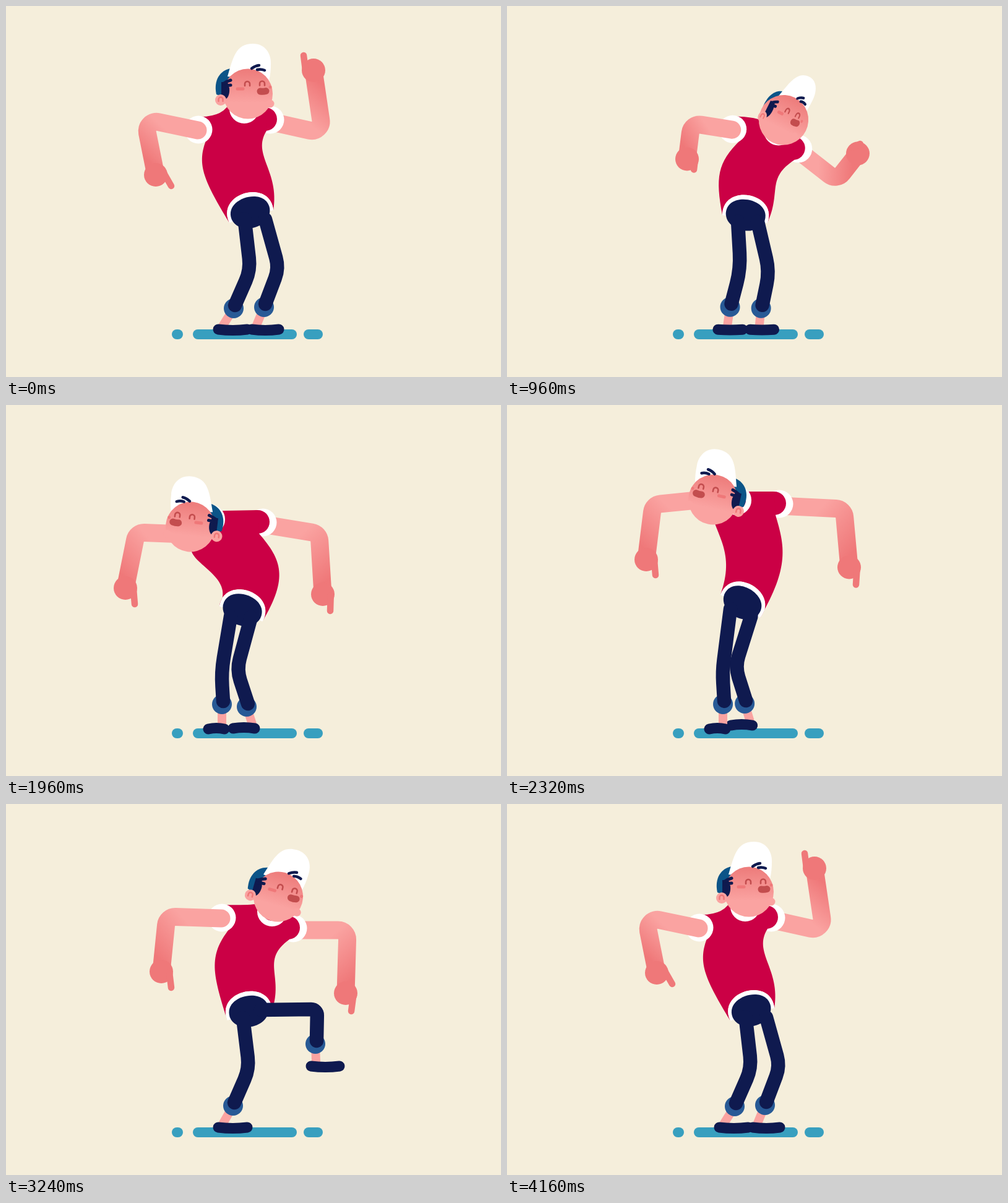
An HTML page with a canvas that plays this animation: 800 px wide and 600 px high, repeating every 4200 ms.

```html
<!DOCTYPE html>
<html lang="en">
<head>
<meta charset="utf-8">
<title>Dancer</title>
<style>
html, body { margin: 0; width: 100%; height: 100%; overflow: hidden; background: #f5eedb; }
canvas { display: block; }
</style>
</head>
<body>
<canvas id="stage" width="800" height="600"></canvas>
<script>
const ctx = document.getElementById('stage').getContext('2d');
const LOOP = 4200, STEP = 40;
const RED = '#cb0045', WHITE = '#fff', NAVY = '#0f1a4f', CUFF = '#285a96', CAP = '#0c5488',
  TEAL = '#389fbf', LIGHT = '#faa3a1', DARK = '#ef7879', LIP = '#c34d4e';

// head: x, y, tilt, facing     hip: x, y, tilt     sleeves: left x, y, right x, y
// bend: side curves of the shirt, left then right
// arms: elbow, hand, fingertip     legs: knee, cuff, shoe ends and height
const groove = {
  head: [391, 142, 0, 1], collar: [385, 166], hip: [395.5, 336.5, -.28],
  sleeves: [311, 200, 427, 184], bend: [-28, -27, -28, 14],
  armL: [224, 183, 242, 273, 267, 291], armR: [512, 206, 497, 104, 481, 80],
  legL: [395, 427, 368, 489, 343, 390, 523], legR: [441, 424, 417, 487, 397, 441, 523], hipR: [419, 345]
};
const lean = {
  head: [477, 178, .62, 1], collar: [460, 197], hip: [387, 337, .1],
  sleeves: [381, 181, 485, 234], bend: [-42, -31, -52, 0],
  armL: [303, 137, 261, 213, 267, 243], armR: [553, 290, 602, 202, 604, 171],
  legL: [389, 422, 365, 487, 343, 390, 523], legR: [442, 427, 418, 488, 397, 441, 523], hipR: [409, 345]
};
const crouch = {
  head: [363, 202, 0, -1], collar: [380, 214], hip: [380, 351, .4],
  sleeves: [319, 250, 431, 222], bend: [13, 8, 24, 33],
  armL: [285, 337, 375, 344, 400, 325], armR: [476, 261, 469, 341, 478, 369],
  legL: [345, 432, 348, 486, 335, 355, 524], legR: [373, 435, 390, 491, 381, 405, 524], hipR: [394, 360]
};
const bow = {
  head: [298, 197, .12, -1], collar: [330, 185], hip: [381, 334, .34],
  sleeves: [288, 208, 415, 190], bend: [-26, 43, 35, 44],
  armL: [211, 206, 193, 296, 208, 322], armR: [506, 208, 512, 306, 524, 333],
  legL: [348, 432, 349, 484, 327, 353, 524], legR: [373, 428, 389, 488, 367, 402, 523], hipR: [396, 343]
};
const kickLeft = {
  head: [333, 153, .21, -1], collar: [371, 154], hip: [379, 322, .53],
  sleeves: [318, 152, 440, 160], bend: [2, 30, 23, 40],
  armL: [236, 161, 225, 250, 240, 275], armR: [533, 174, 529, 272, 539, 301],
  legL: [350, 410, 350, 481, 327, 353, 524], legR: [268, 304, 267, 362, 231, 268, 399], hipR: [360, 304]
};
const kickRight = {
  head: [440, 150, .28, 1], collar: [430, 174], hip: [393, 338, -.21],
  sleeves: [349, 184, 464, 201], bend: [-34, -24, -38, 10],
  armL: [260, 182, 251, 271, 267, 297], armR: [552, 204, 549, 306, 558, 335],
  legL: [393, 428, 367, 488, 343, 390, 523], legR: [503, 332, 500, 388, 493, 539, 424], hipR: [412, 333]
};

const lerp = (a, b, t) => a + (b - a) * t;
function mix(p, q, t) {
  const out = {};
  for (const k in p) out[k] = p[k].map((v, i) => lerp(v, q[k][i], t));
  return out;
}
const legsOf = ({ legL, legR, hipR }) => ({ legL, legR, hipR });

const keys = [
  [0, groove], [590, lean], [650, lean],
  [1120, mix(lean, crouch, .36)], [1320, crouch],
  [1650, { ...bow, armL: [199, 203, 178, 293, 190, 320] }], [1960, bow],
  [2260, { ...kickLeft, ...legsOf(bow), armR: [545, 168, 554, 262, 565, 290] }],
  [2760, kickLeft],
  [2880, { ...kickLeft, ...legsOf(mix(kickLeft, bow, .4)), armL: [224, 157, 208, 245, 222, 271] }],
  [3030, { ...mix(kickLeft, kickRight, .5), ...legsOf(mix(bow, groove, .6)) }],
  [3240, kickRight],
  [3385, { ...kickRight, ...legsOf(mix(kickRight, groove, .6)), armR: [562, 215, 602, 285, 609, 312] }],
  [4140, groove], [LOOP, groove]
];

function poseAt(t) {
  const i = keys.findIndex(k => k[0] > t);
  const [t0, p] = keys[i - 1], [t1, q] = keys[i];
  const u = (t - t0) / (t1 - t0);
  return mix(p, q, u * u * (3 - 2 * u));
}

function dot(x, y, r, color) {
  ctx.fillStyle = color;
  ctx.beginPath();
  ctx.arc(x, y, r, 0, 7);
  ctx.fill();
}
function brush(color, width) {
  ctx.strokeStyle = color;
  ctx.lineWidth = width;
  ctx.lineCap = ctx.lineJoin = 'round';
}
function line(x1, y1, x2, y2, width, color, sag = 0) {
  brush(color, width);
  ctx.beginPath();
  ctx.moveTo(x1, y1);
  ctx.quadraticCurveTo((x1 + x2) / 2, (y1 + y2) / 2 + sag, x2, y2);
  ctx.stroke();
}
function limb(x, y, jx, jy, ex, ey, width, color, round) {
  brush(color, width);
  ctx.beginPath();
  ctx.moveTo(x, y);
  ctx.arcTo(jx, jy, ex, ey, round);
  ctx.lineTo(ex, ey);
  ctx.stroke();
}
function shape(path, color) {
  ctx.fillStyle = color;
  ctx.fill(new Path2D(path));
}

function arm(x, y, [ex, ey, hx, hy, fx, fy]) {
  const skin = ctx.createLinearGradient(x, y, hx, hy);
  skin.addColorStop(.35, LIGHT);
  skin.addColorStop(.92, DARK);
  limb(x, y, ex, ey, hx, hy, 29, skin, 15);
  dot(hx, hy, 19, DARK);
  const a = Math.atan2(fy - hy, fx - hx) - .95;
  line(hx + 13 * Math.cos(a), hy + 13 * Math.sin(a), fx, fy, 10.5, DARK);
}

// A nearly straight knee is a long soft curve, a raised one a tight corner.
function kneeRadius(x, y, kx, ky, ex, ey) {
  const turn = Math.atan2(ey - ky, ex - kx) - Math.atan2(ky - y, kx - x);
  return Math.min(200, 10 / Math.abs(Math.tan(turn / 2)) ** 1.5);
}

function leg(x, y, [kx, ky, cx, cy, s1, s2, sy], face) {
  line(cx, cy, lerp(s2 - 4, s1 + 8, (face + 1) / 2), sy - 7, 14, LIGHT);
  line(s1, sy, s2, sy, 17, NAVY, 3 * face);
  dot(cx, cy, 16, CUFF);
  const path = [x, y, kx, ky, cx + 2, cy - 5];
  limb(...path, 22.5, NAVY, kneeRadius(...path));
}

function torso({ collar: [cx, cy], hip: [hx, hy, tilt], sleeves: [lx, ly, wx, wy], bend }) {
  const sin = Math.sin(tilt), cos = Math.cos(tilt);
  const at = (x, y) => [hx + x * cos - y * sin, hy + x * sin + y * cos];
  const left = at(-37, 4), right = at(37, 4), hem = [...at(46, -48), ...at(-46, -48), ...left];
  const rx = wx - 8, ry = wy - 1;
  const side = (x1, y1, x2, y2, b1, b2, f1, f2) => ctx.bezierCurveTo(
    lerp(x1, x2, 1 / 3) + b1, lerp(y1, y2, f1),
    lerp(x1, x2, 2 / 3) + b2, lerp(y1, y2, f2), x2, y2);

  dot(wx, wy, 22.5, WHITE);
  dot(rx, ry, 19, RED);
  ctx.beginPath();
  ctx.moveTo(lx, ly - 21);
  ctx.quadraticCurveTo(cx - 32, ly - 20, cx - 22, cy - 13);
  ctx.lineTo(cx + 22, cy - 14);
  ctx.lineTo(rx, ry - 19);
  ctx.lineTo(rx + 2, ry + 19);
  side(rx + 2, ry + 19, ...right, bend[2], bend[3], .3, .5);
  ctx.bezierCurveTo(...hem);
  side(...left, lx + 12, ly + 18, bend[1], bend[0], .5, .7);
  ctx.fill();

  brush(WHITE, 9);
  ctx.beginPath();
  ctx.arc(cx, cy, 19.5, 0, 7);
  ctx.stroke();

  ctx.fillStyle = WHITE;
  ctx.beginPath();
  ctx.moveTo(...right);
  ctx.bezierCurveTo(...hem);
  ctx.fill();
  ctx.fillStyle = NAVY;
  ctx.beginPath();
  ctx.moveTo(...at(32, 0));
  ctx.bezierCurveTo(...at(36, -37), ...at(-36, -37), ...at(-32, 0));
  ctx.bezierCurveTo(...at(-27, 30), ...at(27, 30), ...at(32, 0));
  ctx.fill();
}

function smile(x, y, r, color, width) {
  brush(color, width);
  ctx.beginPath();
  ctx.moveTo(x - r, y + 3);
  ctx.arc(x, y, r, Math.PI, 0);
  ctx.lineTo(x + r, y + 3);
  ctx.stroke();
}

function head([x, y, tilt, face]) {
  const turn = Math.sign(face || 1) * Math.min(1, Math.max(.45, Math.abs(face) * 1.6));
  ctx.save();
  ctx.translate(x, y);
  ctx.rotate(tilt);
  ctx.scale(turn, 1);
  shape('M-51 1C-56-22-45-38-28-41L-15-20L-40 5Z', CAP);
  shape('M-33-28C-24-58-20-81 8-81C30-81 38-62 37-48C37-38 36-30 34-20Z', WHITE);

  const skin = ctx.createLinearGradient(0, -40, 0, 40);
  skin.addColorStop(.05, '#ee7e7d');
  skin.addColorStop(.68, LIGHT);
  ctx.fillStyle = skin;
  ctx.beginPath();
  ctx.ellipse(0, 0, 40 / Math.abs(turn), 40.5, 0, 0, 7);
  ctx.fill();
  dot(36, 16, 6.5, LIGHT);
  dot(36, -11, 2.5, DARK);

  shape('M-43-19L-33-19L-30-9C-29 1-33 9-38 9L-43 2Z', NAVY);
  line(-39, -17, -28, -22, 5, NAVY, -1);
  line(-39, -12, -28, -14, 5, NAVY, -1);
  line(6, -41, 18, -46, 4.5, NAVY, -2);
  line(15, -39, 27, -38, 4.5, NAVY, -2);
  dot(-44, 10, 9, LIGHT);
  smile(-44, 9, 3.5, DARK, 2.5);

  smile(-1, -16, 4, LIP, 2.6);
  smile(23, -16.5, 4, LIP, 2.6);
  line(-17, -8, -8, -8, 5, DARK);
  line(20, -4, 29, -4.5, 11, LIP, 1);
  ctx.restore();
}

function draw(now) {
  const t = now % LOOP;
  const p = poseAt(t - t % STEP);
  const face = p.head[3], [lx, ly, rx, ry] = p.sleeves;
  ctx.fillStyle = '#f5eedb';
  ctx.fillRect(0, 0, 800, 600);
  line(276, 531, 278, 531, 16, TEAL);
  line(310, 531, 462, 531, 16, TEAL);
  line(489, 531, 504, 531, 16, TEAL);

  arm(rx, ry + 3, p.armR);
  torso(p);
  leg(...p.hipR, p.legR, face);
  leg(p.hip[0] - 14 + 4 * face, p.hip[1] + 8, p.legL, face);
  dot(lx, ly, 22.5, WHITE);
  arm(lx - 1, ly + 1, p.armL);
  head(p.head);
  requestAnimationFrame(() => draw(performance.now()));
}
draw(0);
</script>
</body>
</html>
```
